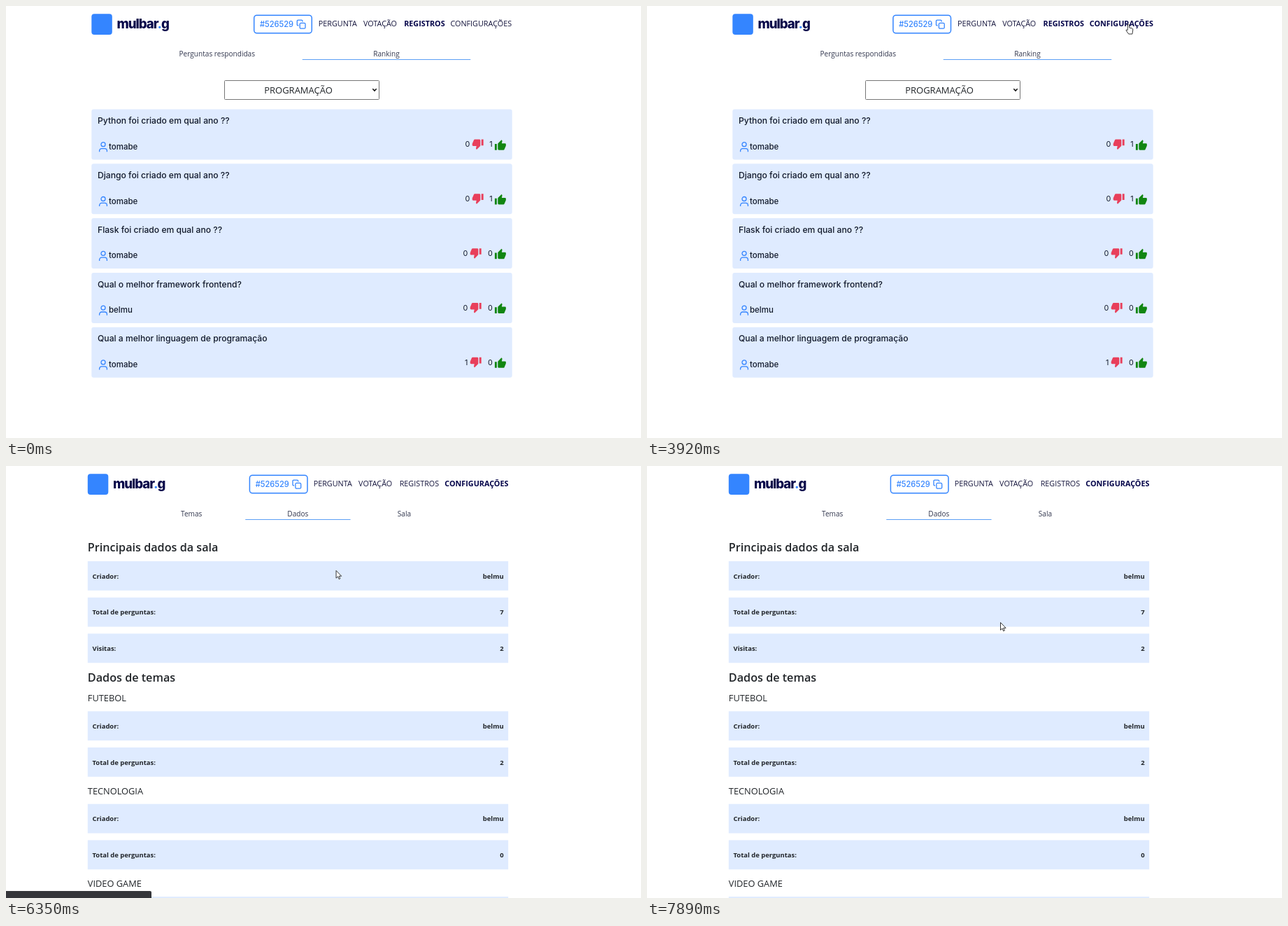
These frames come from a looping animation (908 px wide and 617 px high, 8 s). An HTML page:

```html
<!DOCTYPE html>
<html lang="pt-BR">
<head>
<meta charset="utf-8">
<title>Sala de perguntas</title>
<style>
  html, body { margin: 0; width: 100%; height: 100%; overflow: hidden; background: #fff; }
  svg { display: block; width: 100%; height: 100%; }
  text { font-family: "Open Sans", "Noto Sans", sans-serif; fill: #212529; white-space: pre; }
  .geo { font-family: Inter, sans-serif; fill: #121a2b; }
  .word { font-weight: 800; font-size: 18.6px; letter-spacing: -1px; fill: #08084a; }
  .code { font-weight: 500; font-size: 11.1px; fill: #3485ff; }
  .nav { font-size: 10.8px; fill: #14143c; }
  .nav.on { font-weight: 700; fill: #05054a; }
  .tab { font-size: 10.1px; fill: #33384f; }
  .select { font-size: 13px; }
  .ask { font-size: 12.15px; font-weight: 500; }
  .user { font-size: 11.5px; font-weight: 500; }
  .vote { font-size: 10.8px; }
  .h2 { font-size: 16.2px; font-weight: 600; }
  .h3 { font-size: 12.8px; font-weight: 500; }
  .label { font-size: 12.3px; font-weight: 600; }
  .row { font-size: 9.75px; }
  .strong { font-size: 9.45px; font-weight: 700; }
  .hint { font-size: 9.4px; fill: #8faedb; }
  .button { font-size: 9.9px; font-weight: 500; fill: #fff; }
  .line { fill: none; stroke: #3485ff; stroke-width: 1.3; }
</style>
</head>
<body>
<svg viewBox="0 0 908 617" preserveAspectRatio="none">
  <defs>
    <path id="thumb" d="M1 21h4V9H1zM23 10q0-2-2-2h-6.3l1-4.9-.4-1-1.100-1.100-6.600 6.600Q7 8.200 7 9v10q0 2 2 2h9q1.300 0 1.840-1.200l3-7.100z"/>
    <g id="user" class="line">
      <circle cx="6" cy="3.4" r="3"/>
      <path d="M.6 14v-1.500a3.200 3.200 0 0 1 3.200-3.200h4.400a3.200 3.200 0 0 1 3.200 3.200V14"/>
    </g>
    <g id="copy" class="line">
      <rect x="4.500" y="4.800" width="7.800" height="7.800" rx="1.500"/>
      <path d="M2.800 8.300h-.7q-1.500 0-1.500-1.500V2q0-1.500 1.500-1.500h4.700q1.500 0 1.500 1.500v.9"/>
    </g>
    <g id="remove">
      <circle r="6.600" fill="#f0432f"/>
      <path d="M-2.200-2.200l4.400 4.400M2.200-2.200l-4.400 4.400" stroke="#fff" stroke-width="1.300"/>
    </g>
  </defs>
  <g id="stage"></g>
  <rect id="status" x="-4" y="607" width="212" height="16" rx="2" fill="#35363a"/>
  <g id="cursor" fill="#fff" stroke="#222" stroke-width=".9" stroke-linejoin="round">
    <path id="arrow" d="M.5.5v10.800l2.500-2.300 1.600 3.700 1.700-.7-1.600-3.600h3.400z"/>
    <path id="hand" d="M-1.200 8V1.200q1.200-1.500 2.400 0v4.300l3.700.8q1.600.4 1.400 2.200l-.9 6H.2l-3.700-5.200q.2-1.800 2.300-.3z"/>
  </g>
</svg>
<script>
const $ = id => document.getElementById(id);
const BAR = '#dfebff', BLUE = '#3485ff', OWNER = 'belmu', GUEST = 'tomabe';

const text = (s, x, y, cls, anchor = 'start') =>
  `<text x="${x}" y="${y}" class="${cls}" text-anchor="${anchor}">${s}</text>`;
const rect = (x, y, w, h, fill, extra = '') =>
  `<rect x="${x}" y="${y}" width="${w}" height="${h}" fill="${fill}" ${extra}/>`;
const use = (id, x, y) => `<use href="#${id}" x="${x}" y="${y}"/>`;

function scene(html) {
  const g = document.createElementNS('http://www.w3.org/2000/svg', 'g');
  g.innerHTML = html;
  $('stage').append(g);
  return g;
}

const NAV = ['PERGUNTA', 'VOTAÇÃO', 'REGISTROS', 'CONFIGURAÇÕES'];

function header(left, xs, active) {
  return rect(122.3, 11.3, 29.5, 29.7, BLUE, 'rx="4"') +
    text(`mulbar<tspan fill="${BLUE}">.</tspan>g`, 158.5, 32, 'geo word') +
    rect(left + .7, 13.2, 82.6, 25.6, '#fff', 'rx="4" stroke="#3485ff" stroke-width="1.5"') +
    text('#526529', left + 9, 29.6, 'geo code') +
    use('copy', left + 61.7, 19.6) +
    NAV.map((s, i) => text(s, xs[i], 29.4, active.includes(i) ? 'nav on' : 'nav')).join('');
}

function tabs(names, centers, active, width) {
  return names.map((s, i) => text(s, centers[i], 71.5, 'tab', 'middle')).join('') +
    rect(centers[active] - width / 2, 76, width, 1, '#5c9ff5');
}

function thumbs(down, up, y) {
  const x = up === 1 ? 667 : 664;
  return text(down, x - 3.6, y + 11.6, 'geo vote', 'end') +
    `<use href="#thumb" fill="#e83f5b" transform="translate(${x + 16.4} ${y + 16}) scale(-.727)"/>` +
    text(up, 695.7, y + 11.6, 'geo vote', 'end') +
    `<use href="#thumb" fill="#118611" transform="translate(698.2 ${y + .6}) scale(.727)"/>`;
}

function ranking() {
  const cards = [
    ['Python foi criado em qual ano ??', GUEST, 0, 1],
    ['Django foi criado em qual ano ??', GUEST, 0, 1],
    ['Flask foi criado em qual ano ??', GUEST, 0, 0],
    ['Qual o melhor framework frontend?', OWNER, 0, 0],
    ['Qual a melhor linguagem de programação', GUEST, 1, 0],
  ];
  return tabs(['Perguntas respondidas', 'Ranking'], [301.8, 544], 1, 240.5) +
    rect(312.5, 106.5, 221, 27, '#fff', 'rx="1" stroke="#767676"') +
    text('PROGRAMAÇÃO', 418, 125.3, 'select', 'middle') +
    '<path d="M524.300 118.300l2.700 2.800 2.700-2.800" fill="none" stroke="#111" stroke-width="1.500"/>' +
    cards.map(([ask, user, down, up], i) => {
      const y = 147.5 + 77.8 * i;
      return rect(122.3, y, 601.4, 72, BAR, 'rx="3"') +
        text(ask, 131, y + 20.6, 'geo ask') +
        use('user', 133, y + 46.8) +
        text(user, 147, y + 57.3, 'geo user') +
        thumbs(down, up, y + 42.3);
    }).join('');
}

const bar = (y, content) => rect(122.3, y, 601.4, 41.8, BAR) + content(y + 24.6);
const themeBar = (name, y, active) => bar(y, base =>
  text(name, 129, base, 'row') + (active
    ? use('remove', 662, y + 21) + text('Desativar', 714, base + .4, 'row', 'end')
    : ''));
const dataBar = (label, value, y) => bar(y, base =>
  text(label, 129, base, 'strong') + text(value, 717.2, base, 'strong', 'end'));

const CONFIG_TABS = [['Temas', 'Dados', 'Sala'], [270.7, 422.9, 575]];

const themes = () => tabs(...CONFIG_TABS, 0, 150.3) +
  text('Ativos', 122.3, 121.7, 'h2') +
  themeBar('VIDEO GAME', 136, true) + themeBar('FUTEBOL', 188.4, true) +
  text('Inativos', 122.3, 257.2, 'h2') +
  themeBar('PROGRAMAÇÃO', 271.4) + themeBar('TECNOLOGIA', 323) +
  text('Criar temas', 122.3, 399.6, 'label') +
  rect(122.8, 414.4, 180.6, 30, '#fff', 'rx="3" stroke="#7c9acb"') +
  text('Tema', 137, 433, 'hint') +
  rect(122.3, 452, 181.6, 30.6, BLUE, 'rx="3"') +
  text('Adicionar Tema', 213.2, 470.8, 'button', 'middle');

const roomData = () => tabs(...CONFIG_TABS, 1, 150.3) +
  text('Principais dados da sala', 122.3, 121.7, 'h2') +
  dataBar('Criador:', OWNER, 136) + dataBar('Total de perguntas:', 7, 187.8) +
  dataBar('Visitas:', 2, 239.4) +
  text('Dados de temas', 122.3, 308, 'h2') +
  [['FUTEBOL', 2], ['TECNOLOGIA', 0], ['VIDEO GAME', 2]].map(([name, count], i) => {
    const y = 336.2 + 132.4 * i;
    return text(name, 122.3, y, 'h3') +
      dataBar('Criador:', OWNER, y + 14.1) + dataBar('Total de perguntas:', count, y + 65.8);
  }).join('');

const configHeader = header(353.2, [445.2, 509.6, 568.2, 632.8], [3]);
const headIdle = scene(header(354, [446.8, 510.9, 569.2, 635.4], [2]));
const headHover = scene(header(351.2, [444, 508.2, 566.6, 632.8], [2, 3]));
const rankPage = scene(ranking());
const themePage = scene(configHeader + themes());
const dataPage = scene(configHeader + roomData());

const HOVER = 2650, OPEN_CONFIG = 4320, OPEN_DATA = 6050, LOOP = 8000;

// time, x, y of the pointer tip
const POINTER = [
  [610, 560, 0], [700, 330, 160], [850, 420, 480], [980, 620, 602], [1120, 864, 430],
  [1250, 760, 250], [1410, 497, 300], [1490, 560, 320], [1600, 672, 290], [1760, 591, 238],
  [2090, 591, 238], [2710, 688.5, 25.5], [3920, 688.5, 25.5], [4140, 689.5, 26.5],
  [4930, 689.5, 26.5], [5280, 559.5, 123.5], [5400, 520, 142], [5680, 438, 70],
  [6150, 436, 70], [6540, 505, 223], [LOOP, 505, 223],
];
const SCROLL = [[0, 0], [6930, 0], [7010, 16], [7080, 50], [7150, 67.5],
  [7610, 67.5], [7680, 66], [7750, 42], [7820, 12], [7890, 0], [LOOP, 0]];
const STATUS = [[0, 0], [5745, 0], [5750, 1], [6850, 1], [7010, .27], [7080, 0], [LOOP, 0]];

function sample(track, t) {
  const i = track.findIndex(k => k[0] > t);
  if (i < 1) return track[0].slice(1);
  const a = track[i - 1], b = track[i], p = (t - a[0]) / (b[0] - a[0]);
  return a.slice(1).map((v, n) => v + (b[n + 1] - v) * p);
}

const show = (el, on) => el.setAttribute('visibility', on ? 'visible' : 'hidden');
const between = (t, a, b) => t >= a && t < b;

function draw(t) {
  show(headIdle, t < HOVER);
  show(headHover, between(t, HOVER, OPEN_CONFIG));
  show(rankPage, t < OPEN_CONFIG);
  show(themePage, between(t, OPEN_CONFIG, OPEN_DATA));
  show(dataPage, t >= OPEN_DATA);
  dataPage.setAttribute('transform', `translate(-5.5 ${-sample(SCROLL, t)[0]})`);
  $('status').setAttribute('opacity', sample(STATUS, t)[0]);

  const hand = between(t, HOVER, 4980) || between(t, 5680, 6200);
  const [x, y] = sample(POINTER, t);
  $('cursor').setAttribute('transform', `translate(${x} ${y})`);
  show($('arrow'), t >= POINTER[0][0] && !hand);
  show($('hand'), hand);
}

const start = performance.now();
function tick() {
  draw((performance.now() - start) % LOOP);
  requestAnimationFrame(tick);
}
tick();
</script>
</body>
</html>
```
